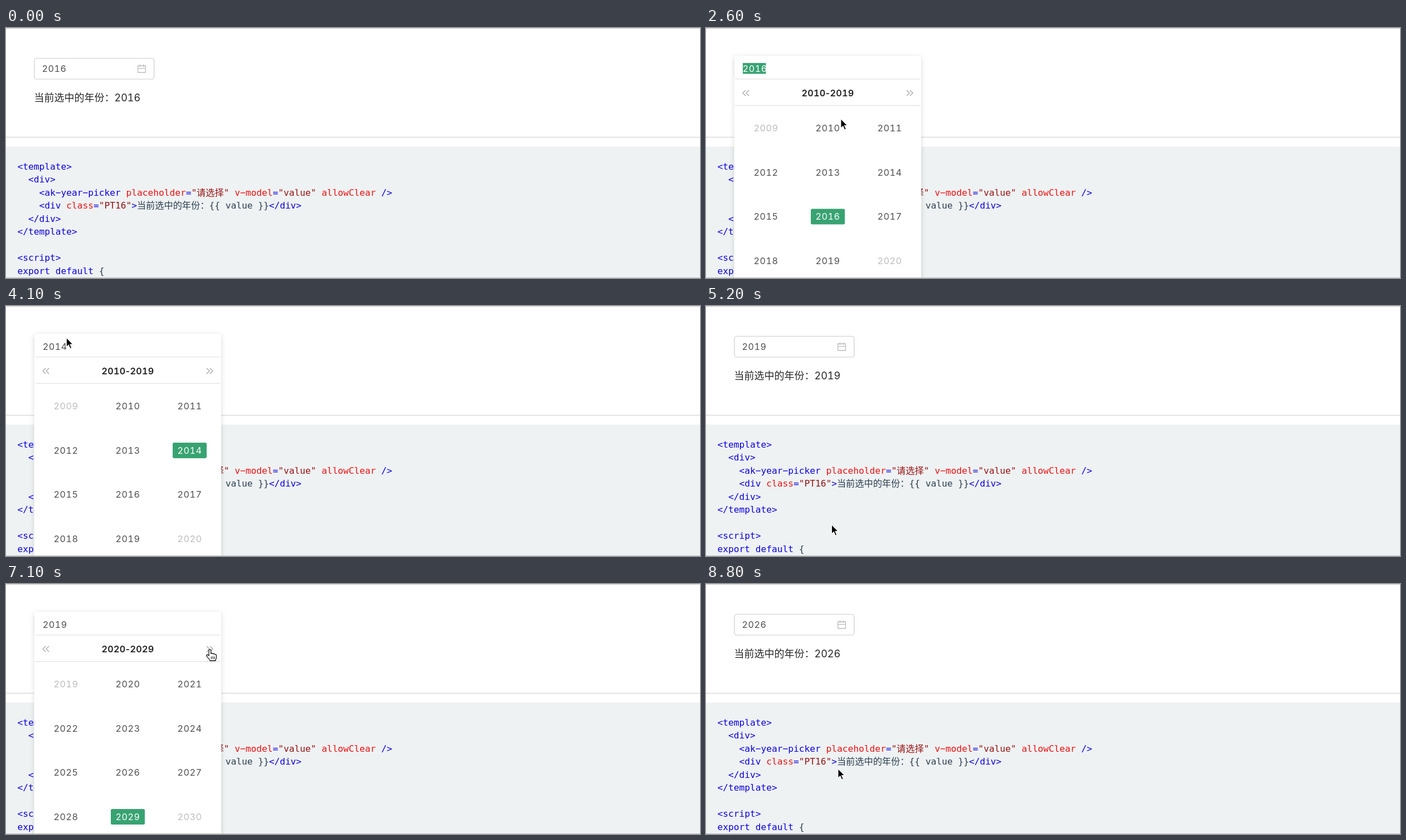
These frames come from a looping animation (1245x450 px, 8.9 s). An HTML page:

```html
<!DOCTYPE html>
<html lang="zh-CN">
<head>
<meta charset="utf-8">
<title>Year picker</title>
<style>
  html, body { margin: 0; width: 100%; height: 100%; overflow: hidden; background: #fff; }
  svg { display: block; width: 100%; height: 100%; }
  text { font: 16.2px Inter, "Noto Sans CJK SC", sans-serif; font-variant-numeric: tabular-nums; white-space: pre; }
  .year { letter-spacing: .5px; fill: #505050; }
  .mid { text-anchor: middle; }
  .title { font-weight: 600; letter-spacing: .3px; fill: #1f1f1f; }
  .dash { font-variant-numeric: normal; }
  .label { font-size: 18px; fill: #262626; }
  .code text { font: 16.2px "DejaVu Sans Mono", "Noto Sans CJK SC", monospace; fill: #2c3e50; }
  .code .t { fill: #0a00e0; }
  .code .a { fill: #f01010; }
  .code .s { fill: #981212; }
  .icon { fill: none; stroke: #bcbcbc; stroke-width: 1.3; }
  .arrows { fill: none; stroke: #a0a0a0; stroke-width: 1.2; }
  .sheet { filter: drop-shadow(0 2px 4px rgba(0, 0, 0, .15)); }
  #cursor > g { display: none; }
</style>
</head>
<body>
<svg viewBox="0 0 1245 450">
  <defs>
    <path id="beamShape" d="M-4-9Q0-9 0-6V6Q0 9-4 9M4-9Q0-9 0-6M0 6Q0 9 4 9M-2.8 2.5H2.8"/>
  </defs>

  <rect width="1245" height="450" fill="#fff"/>
  <rect y="196" width="1245" height="1" fill="#d3d3d3"/>
  <rect y="197" width="1245" height="1" fill="#f6f6f6"/>
  <rect y="213.5" width="1245" height="236.5" fill="#eef2f3"/>

  <rect x="51" y="54.5" width="214.7" height="37.5" rx="4" fill="#fff" stroke="#cdcdcd" stroke-width="1.2"/>
  <text id="field" class="year" x="64.4" y="79.4"></text>
  <path class="icon" d="M236.6 68H250.4V80H236.6ZM236.6 72.6H250.4M240.4 65.5V70M246.6 65.5V70"/>
  <text id="label" class="label" x="50.5" y="132"></text>

  <g id="code" class="code"></g>

  <g id="panel">
    <rect class="sheet" x="50.5" y="50" width="335.5" height="408" rx="4" fill="#fff"/>
    <path d="M52 91.8H385M52 139.5H385" stroke="#e4e4e4" stroke-width="1.3"/>
    <rect id="mark" x="66" y="63" width="41.5" height="19.5" fill="#38a372"/>
    <text id="typed" class="year" x="65.8" y="79"></text>
    <path class="arrows" d="M71 112l-5 5 5 5M77 112l-5 5 5 5M360 112l5 5-5 5M366 112l5 5-5 5"/>
    <text class="mid title" x="218.5" y="122.8"><tspan id="first"></tspan><tspan class="dash">-</tspan><tspan id="last"></tspan></text>
    <g id="cells"></g>
  </g>

  <rect width="1245" height="1" fill="#c4c4c4"/>
  <rect y="449" width="1245" height="1" fill="#c0c0c0"/>

  <g id="cursor">
    <g id="arrow">
      <path transform="translate(-.2 -.6) scale(1.05)" d="M0 0V16.2L3.8 12.7 6.4 18.9 9.1 17.8 6.5 11.7H11.6Z" stroke="#fff" stroke-width="1.2"/>
    </g>
    <g id="beam" fill="none">
      <use href="#beamShape" stroke="#fff" stroke-width="3.2"/>
      <use href="#beamShape" stroke="#111" stroke-width="1.5"/>
    </g>
    <g id="hand">
      <path d="M-2 11V1.6a1.8 1.8 0 0 1 3.6 0V7.2Q4.4 6 5.2 7.8 7.8 6.9 8.4 8.7 11.4 8.2 11.4 11V14.2Q11.4 16 9.9 18.4V20H0Q-1 17.4-3.8 14.6-6.8 11.2-6.2 10-5 8-2 11Z"
            fill="#fff" stroke="#111" stroke-width="1.3" stroke-linejoin="round"/>
      <path d="M2.3 12.5V17M5 12.5V17M7.7 12.5V17" stroke="#111" stroke-width="1.1"/>
    </g>
  </g>
</svg>

<script>
const LOOP = 8900, STEP = 100;
const $ = id => document.getElementById(id);

function make(parent, tag, attrs, content = '') {
  const node = document.createElementNS('http://www.w3.org/2000/svg', tag);
  for (const key in attrs) node.setAttribute(key, attrs[key]);
  node.textContent = content;
  parent.append(node);
  return node;
}

// Each line alternates style and text: t tag, a attribute, s string, p plain.
const lines = [
  ['t', '<template>'],
  ['t', '  <div>'],
  ['t', '    <ak−year−picker ', 'a', 'placeholder', 't', '=', 's', '"请选择"', 'a', ' v−model', 't', '=',
   's', '"value"', 'a', ' allowClear', 't', ' />'],
  ['t', '    <div ', 'a', 'class', 't', '=', 's', '"PT16"', 't', '>', 'p', '当前选中的年份：{{ value }}', 't', '</div>'],
  ['t', '  </div>'],
  ['t', '</template>'],
  [],
  ['t', '<script' + '>'],
  ['t', 'export default', 'p', ' {']
];
lines.forEach((line, row) => {
  const text = make($('code'), 'text', { x: 20.5, y: 255 + row * 23.45 });
  for (let i = 0; i < line.length; i += 2) make(text, 'tspan', { class: line[i] }, line[i + 1]);
});

const cells = Array.from({ length: 12 }, (_, i) => {
  const x = 107.5 + (i % 3) * 111, y = 180.5 + Math.floor(i / 3) * 79.5;
  return {
    box: make($('cells'), 'rect', { x: x - 30.5, y: y - 14, width: 61, height: 28, rx: 2.5, fill: '#38a372' }),
    text: make($('cells'), 'text', { class: 'mid year', x, y: y + 5.8 })
  };
});

// Each visit to the picker: opening, choice, and the years before and after.
const visits = [
  { open: 1290, pick: 3200, from: 2016, to: 2014 },
  { open: 3955, pick: 5100, from: 2014, to: 2019 },
  { open: 6155, pick: 8300, from: 2019, to: 2026 }
];
const OPEN_TIME = 200, CLOSING = .88, PAGE_TURN = 7100;
const easeOut = u => 1 - (1 - Math.min(u, 1)) ** 5;

// time, x, y, shape
const path = [
  [100, 330, 432, 'arrow'], [500, 215, 190, 'arrow'], [800, 156, 74, 'beam'], [900, 153.5, 62, 'beam'],
  [1300, 153.5, 61, 'arrow'], [1500, 153.5, 61, 'beam'], [1700, 154, 70, 'beam'], [1900, 158, 76, 'beam'],
  [2300, 158, 76, 'beam'], [2500, 200, 120, 'arrow'], [2800, 326, 252, 'hand'], [3100, 338, 275, 'hand'],
  [3200, 338, 275, 'arrow'], [3400, 316, 240, 'arrow'], [3800, 118, 72, 'beam'], [3900, 108, 55, 'beam'],
  [4000, 108, 55, 'arrow'], [4200, 109, 60, 'beam'], [4300, 118, 100, 'arrow'], [4700, 210, 395, 'hand'],
  [4900, 226, 418, 'hand'], [5100, 226, 418, 'arrow'], [5300, 225, 370, 'arrow'], [5700, 213, 92, 'beam'],
  [5900, 210, 78, 'beam'], [6000, 210, 77, 'beam'], [6200, 210, 77, 'arrow'], [6400, 230, 84, 'beam'],
  [6500, 270, 100, 'arrow'], [6800, 362, 117, 'hand'], [6900, 366, 118, 'hand'], [7300, 366, 118, 'hand'],
  [7500, 350, 150, 'arrow'], [7900, 236, 322, 'hand'], [8100, 224, 338, 'hand'], [8300, 224, 338, 'arrow'],
  [8600, 234, 334, 'arrow'], [8800, 237, 333, 'arrow']
];

function drawCursor(t) {
  const i = path.findLastIndex(p => p[0] <= t);
  const [t0, x0, y0, shape] = path[i] || [];
  for (const name of ['arrow', 'beam', 'hand']) $(name).style.display = name === shape ? 'inline' : 'none';
  if (i < 0) return;
  const [t1, x1, y1] = path[i + 1] || [LOOP, x0, y0];
  const k = (t - t0) / (t1 - t0);
  $('cursor').setAttribute('transform', `translate(${x0 + (x1 - x0) * k} ${y0 + (y1 - y0) * k})`);
}

function drawPanel(t) {
  const visit = visits.find(v => t >= v.open && t < v.pick + STEP);
  $('panel').style.display = visit ? 'inline' : 'none';
  if (!visit) return;

  const { open, pick, from, to } = visit;
  const leaving = t >= pick;
  const shown = leaving ? CLOSING : easeOut((t - open) / OPEN_TIME);
  $('panel').setAttribute('opacity', shown);
  $('panel').setAttribute('transform', `translate(0 50) scale(1 ${.8 + .2 * shown}) translate(0 -50)`);

  const marked = visit === visits[0] && !leaving;
  $('mark').style.display = marked ? 'inline' : 'none';
  $('typed').style.fill = marked ? '#fff' : '';
  $('typed').textContent = from;

  const shift = t >= PAGE_TURN ? 10 : 0;
  const decade = 2010 + shift;
  $('first').textContent = decade;
  $('last').textContent = decade + 9;
  cells.forEach(({ box, text }, i) => {
    const year = decade - 1 + i;
    const old = year === from + shift;
    const fill = leaving ? (year === to ? .85 : old ? .15 : 0) : +old;
    box.setAttribute('opacity', fill);
    text.textContent = year;
    text.style.fill = fill > .5 ? '#fff' : i % 11 ? '' : '#bdbdbd';
  });
}

function draw(now) {
  const t = Math.floor(now % LOOP / STEP) * STEP;
  const year = visits.findLast(v => t >= v.pick)?.to ?? 2016;
  $('field').textContent = year;
  $('label').textContent = '当前选中的年份：' + year;
  drawPanel(t);
  drawCursor(t);
}

const start = performance.now();
function tick() {
  draw(performance.now() - start);
  requestAnimationFrame(tick);
}
tick();
</script>
</body>
</html>
```
